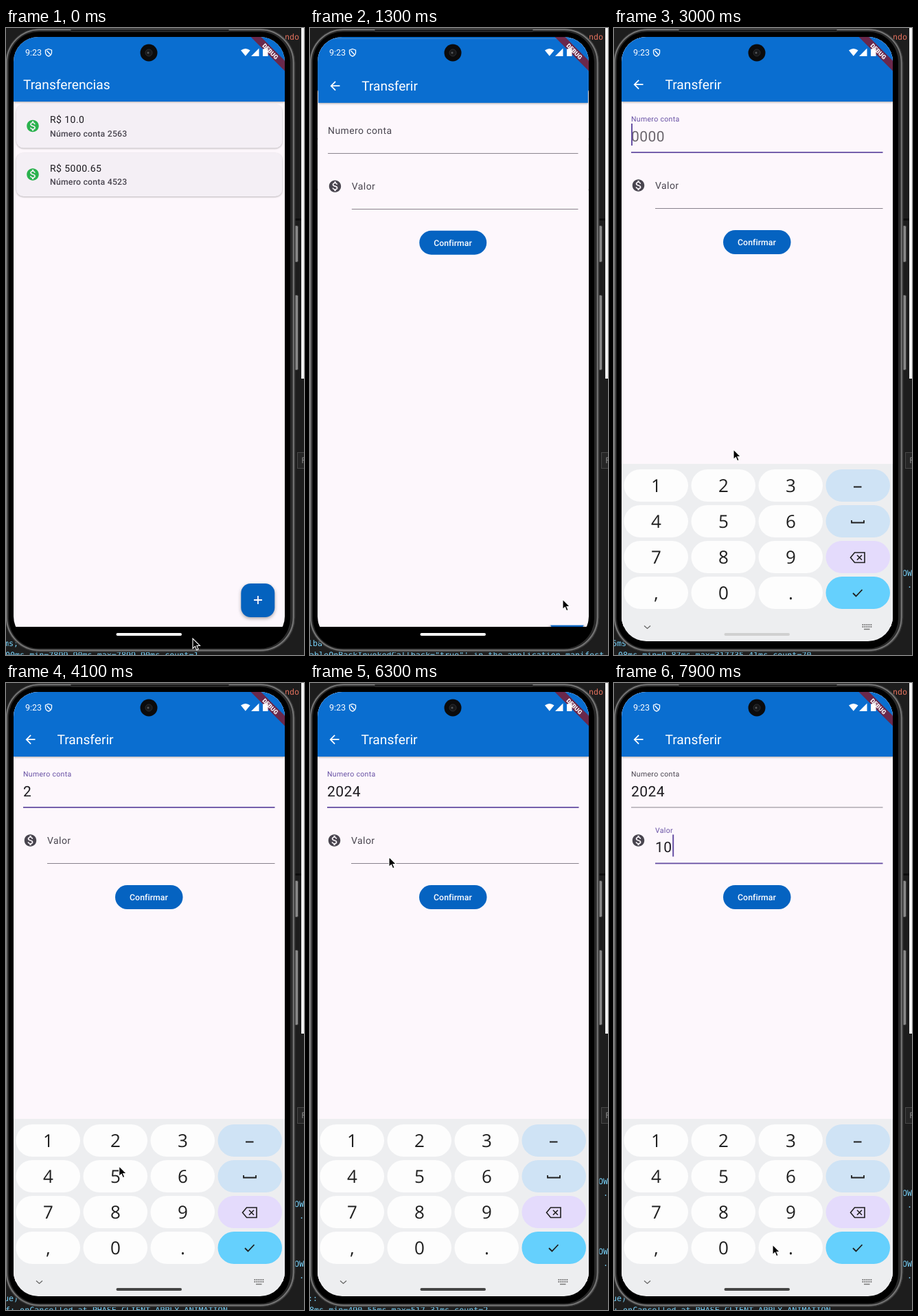
Recreate the animation shown at these times as an HTML page. Size 434 by 912 pixels, loop 8 s.

```html
<!DOCTYPE html>
<html lang="pt">
<head>
<meta charset="utf-8">
<title>Transferencias</title>
<style>
html, body { margin: 0; width: 100%; height: 100%; overflow: hidden; background: #1d1d1d; }
svg { display: block; width: 100%; height: 100%; }
text { font-family: Roboto, sans-serif; white-space: pre; text-rendering: geometricPrecision; }
.mono { font: 11.7px "DejaVu Sans Mono", monospace; fill: #78d3fb; }
.title { font-size: 19.2px; fill: #fff; }
.amount { font-size: 14px; letter-spacing: .44px; fill: #1d1b20; }
.account { font-size: 12.25px; font-weight: 500; letter-spacing: .22px; fill: #49454f; }
.label { font-size: 14px; letter-spacing: .44px; }
.value { font-size: 21px; letter-spacing: .44px; }
.key { font: 26px "Open Sans", sans-serif; fill: #1f1f1f; text-anchor: middle; }
.card { fill: #f4eff5; filter: drop-shadow(0 1px .8px #0004); }
.bar { fill: #0a6ed0; filter: drop-shadow(0 1.500px 1.500px #0005); }
.line { fill: none; stroke: #1f1f1f; stroke-width: 1.8; }
.paper { fill: #fdf7fc; }
</style>
</head>
<body>
<svg viewBox="0 0 434 912" preserveAspectRatio="none">
  <defs>
    <clipPath id="screenClip"><rect x="11" y="13" width="395" height="879" rx="36"/></clipPath>
    <clipPath id="pageClip"><rect x="11" y="13" width="395" height="858"/></clipPath>
    <path id="coin" d="M12 2C6.48 2 2 6.48 2 12s4.48 10 10 10 10-4.48 10-10S17.52 2 12 2zm1.41 16.09V20h-2.67v-1.93c-1.71-.36-3.16-1.46-3.27-3.4h1.96c.1 1.05.82 1.87 2.65 1.87 1.96 0 2.4-.98 2.4-1.59 0-.83-.44-1.61-2.67-2.14-2.48-.6-4.18-1.62-4.18-3.67 0-1.72 1.39-2.84 3.11-3.21V4h2.67v1.95c1.86.45 2.79 1.86 2.85 3.39H14.3c-.05-1.11-.64-1.87-2.22-1.87-1.5 0-2.4.68-2.4 1.64 0 .84.65 1.39 2.67 1.91s4.18 1.39 4.18 3.91c-.01 1.83-1.38 2.83-3.12 3.16z"/>
  </defs>

  <!-- editor behind the phone -->
  <rect width="434" height="912" fill="#1d1d1d"/>
  <rect x="430" width="4" height="510" fill="#f2f2f2"/>
  <path d="M421 278.500h9" stroke="#0c0c0c" stroke-width="3"/>
  <text class="mono" x="406" y="17" style="fill:#e0705c">ndo</text>
  <rect x="424.500" y="617.500" width="20" height="23" fill="#262626" stroke="#484848"/>
  <text class="mono" x="430" y="633" style="fill:#8a8a8a">F</text>
  <text class="mono" id="logA" x="-3" y="899"/>
  <text class="mono" id="logB" x="-1" y="916"/>
  <g id="marks"/>

  <!-- phone body -->
  <g fill="#888" stroke="#3a3a3a">
    <rect x="419.500" y="287.500" width="6" height="53" rx="2"/>
    <rect x="419.500" y="388.500" width="6" height="109" rx="2"/>
  </g>
  <rect x="-1" y=".5" width="422" height="907" rx="50" fill="#4c4c4c" stroke="#2c2c2c"/>
  <rect x="1" y="2.500" width="417.500" height="902.500" rx="48" fill="#2a2a2a" stroke="#7c7c7c" stroke-width="1.600"/>
  <rect x="4" y="5.500" width="410" height="897" rx="44"/>
  <rect x="94" y="2" width="231" height="3" rx="1.500" fill="#171717" stroke="#555" stroke-width=".6"/>

  <g clip-path="url(#screenClip)">
    <g clip-path="url(#pageClip)">
      <g id="list">
        <rect class="paper" x="11" y="13" width="395" height="858"/>
        <g id="cards"/>
        <rect class="bar" x="11" y="13" width="395" height="94"/>
        <text class="title" x="25" y="89">Transferencias</text>
        <rect x="342.300" y="808" width="49" height="49" rx="14" fill="#0462be" style="filter:drop-shadow(0 2.500px 2.500px #0005)"/>
        <path d="M361 832h12M367 826v12" stroke="#fff" stroke-width="1.800"/>
      </g>
      <g id="form">
        <rect class="paper" x="11" y="13" width="395" height="858"/>
        <rect class="bar" x="11" y="13" width="395" height="94"/>
        <path transform="translate(25 71.700) scale(.875)" fill="#fff" d="M20 11H7.830l5.590-5.590L12 4l-8 8 8 8 1.410-1.410L7.830 13H20z"/>
        <text class="title" x="74.500" y="89">Transferir</text>
        <g id="account"/>
        <g id="amount"/>
        <use href="#coin" transform="translate(25 218.500) scale(.875)" fill="#49454f"/>
        <rect x="159" y="294" width="98.500" height="35" rx="17.500" fill="#0563c1"/>
        <text x="208" y="316.400" text-anchor="middle" fill="#fff" font-size="12.250" font-weight="500" letter-spacing=".09">Confirmar</text>
      </g>
    </g>

    <path d="M356.500 13h15L406 47.600v15z" fill="#a00000" fill-opacity=".64"/>
    <text transform="translate(385 34) rotate(45)" y="3.200" text-anchor="middle" font-size="8.900" font-weight="900" fill="#fff">DEBUG</text>

    <!-- status bar -->
    <g fill="#fff">
      <text x="28" y="40" font-size="12.500">9:23</text>
      <path d="M62 30.500l4.500 1.700v3.500q0 3.500-4.500 5.500-4.500-2-4.500-5.500v-3.500zM59.500 33l5 5.500" fill="none" stroke="#fff" stroke-width="1.300"/>
      <path d="M342 32.500q6.800-5.200 13.600 0l-6.800 8.300zM357 41h11.500V29.500z"/>
      <path d="M374 30.500h2v-1.300h3.500v1.300h2V41H374z"/>
    </g>

    <g id="keyboard">
      <rect x="11" y="634" width="395" height="258" fill="#edeef0"/>
      <g id="keys"/>
      <g class="line">
        <path d="M349 667.500h11.500M346 716v3.500h18V716M348 822l4.500 4.500 9-9.500"/>
        <path d="M350.500 763H365v14.500h-14.500l-6-7.250zM354 766.800l7 7m0-7l-7 7" stroke-width="1.600"/>
        <path d="M44 869.500l4.500 4 4.500-4" stroke="#666" stroke-width="1.300"/>
        <path d="M361.500 868h14M361.500 871h14" stroke="#777" stroke-dasharray="1.800 1.200"/>
        <path d="M364 874.500h8.500" stroke="#777" stroke-width="1.500"/>
      </g>
    </g>
    <rect id="handle" x="160.500" y="880" width="95.500" height="4" rx="2"/>
  </g>

  <circle cx="208" cy="36" r="12.500" fill="#0b0b0c"/>
  <circle cx="208" cy="36" r="5" fill="#17181a" stroke="#2c2d2f"/>
  <circle cx="207" cy="36" r="1.500" fill="#55575a"/>

  <path id="pointer" d="M0 0V14.500L3.400 11.400 5.600 16.700 8.100 15.600 5.900 10.500H10.500Z" fill="#000" stroke="#fff" stroke-width="1.100"/>
</svg>

<script>
const LOOP = 8000, STEP = 100;
const PURPLE = '#6750a4', GREY = '#49454f';
const $ = id => document.getElementById(id);
const clamp = v => Math.min(1, Math.max(0, v));
const smooth = v => v * v * (3 - 2 * v);
const easeOut = v => 1 - (1 - v) ** 3;
const ramp = (t, from, length, ease = smooth) => ease(clamp((t - from) / length));
const latest = (rows, t) => rows.filter(r => r[0] <= t).pop();

$('cards').innerHTML = [['10.0', 2563], ['5000.65', 4523]].map(([sum, number], i) => `
  <g transform="translate(0 ${i * 70.5})">
    <rect class="card" x="15" y="111" width="387.500" height="63.500" rx="10.500"/>
    <use href="#coin" transform="translate(28.500 132) scale(.875)" fill="#2bb24e"/>
    <text class="amount" x="64" y="138.300">R$ ${sum}</text>
    <text class="account" x="64" y="157.500">Número conta ${number}</text>
  </g>`).join('');

const keyColors = ['#cfe3f5', '#cfe3f5', '#e4dbfc', '#65d0fd'];
$('keys').innerHTML = ['123', '456', '789', ',0.'].map((row, r) => [...row, ''].map((char, c) => `
  <rect x="${14.5 + 98 * c}" y="${642 + 52 * r}" width="93.500" height="47" rx="23.500" fill="${char ? '#fdfdfd' : keyColors[r]}"/>
  <text class="key" x="${61.5 + 98 * c}" y="${675 + 52 * r}">${char}</text>`).join('')).join('');

const fields = [
  { id: 'account', label: 'Numero conta', hint: '0000', x: 25, y: 181, focus: 2600, blur: 6500,
    typed: [[2600, ''], [3500, '2'], [4600, '20'], [5100, '202'], [5600, '2024']] },
  { id: 'amount', label: 'Valor', hint: '0.00', x: 60, y: 262.5, focus: 6500, blur: LOOP,
    typed: [[6500, ''], [7200, '1'], [7700, '10']] }
];

for (const f of fields) {
  $(f.id).innerHTML = `<text class="label">${f.label}</text>
    <text class="value" x="${f.x}" y="${f.y - 16.5}"></text>
    <rect x="${f.x}" width="${391.5 - f.x}"/>
    <rect y="${f.y - 42}" width="2" height="32" fill="${PURPLE}"/>`;
  [f.labelEl, f.valueEl, f.underline, f.caret] = $(f.id).children;
}

function drawField(f, t) {
  const active = t >= f.focus && t < f.blur;
  const [since, value] = latest(f.typed, t) || [0, ''];
  const lift = ramp(t, f.focus - 100, 200);
  f.labelEl.setAttribute('transform',
    `translate(${f.x} ${f.y - 29 - 16 * lift}) scale(${1 - lift / 4})`);
  f.labelEl.setAttribute('fill', active ? PURPLE : GREY);
  f.valueEl.textContent = value || (lift === 1 ? f.hint : '');
  f.valueEl.setAttribute('fill', value ? '#1d1b20' : '#6b666d');
  f.underline.setAttribute('y', active ? f.y - 1 : f.y - .5);
  f.underline.setAttribute('height', active ? 1.8 : .9);
  f.underline.setAttribute('fill', active ? PURPLE : '#7b757f');
  f.caret.setAttribute('x', f.x + 12.24 * value.length + (value ? .7 : 0));
  f.caret.setAttribute('opacity', active && (t - since) % 1000 < 500 ? 1 : 0);
}

// time, x, y
const path = [
  [0, 272, 888], [600, 368, 831], [1500, 368, 831], [2200, 162, 187], [2500, 162, 187],
  [3000, 174, 613], [3300, 166, 663], [3900, 166, 663], [4500, 161, 817], [4700, 161, 817],
  [5000, 180, 663], [5200, 180, 663], [5500, 66, 714], [5700, 66, 714], [6300, 115, 253],
  [6600, 115, 253], [7100, 66, 663], [7300, 66, 663], [7600, 162, 817], [7700, 162, 817],
  [7900, 231, 817], [8000, 231, 817]
];

function pointerAt(t) {
  const i = path.findIndex(p => p[0] > t);
  const [t0, x0, y0] = path[i - 1], [t1, x1, y1] = path[i];
  const k = smooth((t - t0) / (t1 - t0));
  return [x0 + (x1 - x0) * k, y0 + (y1 - y0) * k];
}

const cancelled = 'f: onCancelled at PHASE_CLIENT_APPLY_ANIMATION';
// time, upper line, lower line, heights of the words at the right edge
const log = [
  [0, 'ms;', '00ms min=7899.90ms max=7899.90ms count=1', []],
  [800, '00m', '.89ms min=16346.89ms max=16346.89ms count=1', []],
  [1300, 'lba', 'ableOnBackInvokedCallback="true"\' in the application manifest.', []],
  [2800, '6ms', '.08ms min=9.87ms max=317735.41ms count=70', [797]],
  [3500, 'ue)', cancelled, [762, 849]],
  [5200, '::', '8ms min=490.55ms max=517.31ms count=2', [729, 831]],
  [6700, 'ue)', cancelled.slice(1), [746, 849]]
];

function drawLog(t) {
  const [, upper, lower, words] = latest(log, t);
  $('logA').textContent = upper;
  $('logB').textContent = lower;
  $('marks').innerHTML = words.map(y =>
    `<text class="mono" x="420" y="${y}">OW</text><text class="mono" x="427" y="${y + 17}">.</text>`).join('');
}

function zoom(el, scale, opacity) {
  el.setAttribute('transform', `translate(208.500 442) scale(${scale}) translate(-208.500 -442)`);
  el.setAttribute('opacity', opacity);
}

function draw(t) {
  const open = ramp(t, 1100, 300, easeOut);
  zoom($('list'), 1 + .05 * open, 1);
  zoom($('form'), .85 + .15 * open, clamp(open * 2));
  fields.forEach(f => drawField(f, t));

  const rise = ramp(t, 2600, 300);
  $('keyboard').setAttribute('transform', `translate(0 ${258 * (1 - rise)})`);
  const shade = 255 - 47 * rise - 138 * ramp(t, 3000, 300);
  $('handle').setAttribute('fill', `rgb(${shade},${shade},${shade})`);

  drawLog(t);
  $('pointer').setAttribute('transform', `translate(${pointerAt(t).join(' ')})`);
}

const start = performance.now();
function tick() {
  const t = (performance.now() - start) % LOOP;
  draw(Math.floor(t / STEP) * STEP);
  requestAnimationFrame(tick);
}
tick();
</script>
</body>
</html>
```
